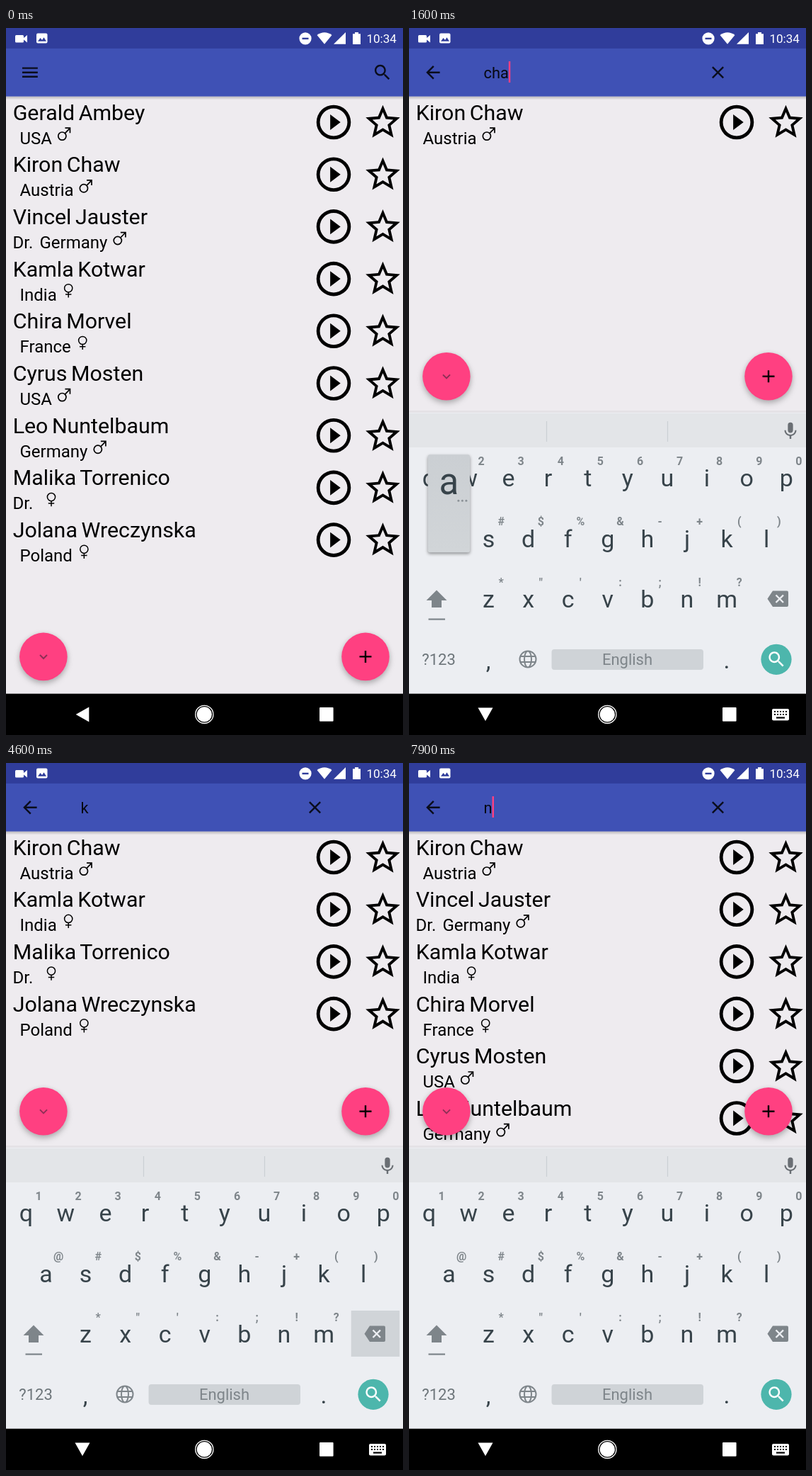
An HTML page that plays this animation: 561x998 px, repeating every 8 s.

```html
<!DOCTYPE html>
<html lang="en">
<head>
<meta charset="utf-8">
<title>Contact search</title>
<style>
  html, body { margin: 0; width: 100%; height: 100%; overflow: hidden; background: #eeebef; }
  svg { display: block; width: 561px; height: 998px; font-family: Roboto, sans-serif; }
  .fab { filter: drop-shadow(0 4px 4px rgba(0, 0, 0, .22)) drop-shadow(0 1px 3px rgba(0, 0, 0, .1)); }
  .pop { filter: drop-shadow(0 2px 2px rgba(0, 0, 0, .4)); }
  .name { word-spacing: -2px; }
</style>
</head>
<body>
<svg id="stage" viewBox="0 0 561 998" xmlns="http://www.w3.org/2000/svg"></svg>
<script>
const LOOP = 8000;
const DP = 561 / 462;
const PITCH = 73.7;
const KEY_W = 56.1;
const QUERY_X = 105.5;
const QUERY_SIZE = 18 * DP;

const people = [
  ['Gerald Ambey', '', 'USA', 'm'],
  ['Kiron Chaw', '', 'Austria', 'm'],
  ['Vincel Jauster', 'Dr.', 'Germany', 'm'],
  ['Kamla Kotwar', '', 'India', 'f'],
  ['Chira Morvel', '', 'France', 'f'],
  ['Cyrus Mosten', '', 'USA', 'm'],
  ['Leo Nuntelbaum', '', 'Germany', 'm'],
  ['Malika Torrenico', 'Dr.', '', 'f'],
  ['Jolana Wreczynska', '', 'Poland', 'f']
];

const keyRows = [
  { keys: 'qwertyuiop', hints: '1234567890', x: 28.3, y: 647 },
  { keys: 'asdfghjkl', hints: '@#$%&-+()', x: 56.4, y: 732.5 },
  { keys: 'zxcvbnm', hints: '*"\':;!?', x: 112.5, y: 818 }
];

// time, query, active key ('<' is backspace), key held down, cursor shown
const steps = [
  [0, '', '', 0, 1],
  [700, '', '', 0, 0],
  [1000, '', 'c', 1, 1],
  [1100, 'c', 'c', 0, 1],
  [1200, 'c', '', 0, 1],
  [1300, 'c', 'h', 1, 1],
  [1400, 'ch', 'h', 0, 1],
  [1500, 'ch', 'a', 1, 1],
  [1600, 'cha', 'a', 0, 1],
  [1700, 'cha', '', 0, 1],
  [1800, 'cha', 'w', 1, 1],
  [1900, 'chaw', 'w', 0, 1],
  [2000, 'chaw', '', 0, 1],
  [2400, 'chaw', '', 0, 0],
  [2700, 'chaw', '<', 1, 0],
  [2800, 'cha', '<', 1, 1],
  [2900, 'ch', '<', 1, 1],
  [3000, 'c', '<', 1, 1],
  [3100, '', '<', 1, 1],
  [3200, '', '', 0, 1],
  [3500, '', '', 0, 0],
  [3600, '', 'k', 1, 0],
  [3700, 'k', 'k', 0, 1],
  [3800, 'k', '', 0, 1],
  [4400, 'k', '', 0, 0],
  [4600, 'k', '<', 1, 0],
  [5000, '', '<', 1, 1],
  [5100, '', '', 0, 1],
  [5500, '', 'd', 1, 1],
  [5600, 'd', 'd', 0, 1],
  [5700, 'd', 'r', 1, 1],
  [5800, 'dr', 'r', 0, 1],
  [5900, 'dr', '', 0, 1],
  [6300, 'dr', '', 0, 0],
  [6600, 'dr', '<', 1, 0],
  [6800, 'd', '', 0, 1],
  [6900, 'd', '<', 1, 1],
  [7000, '', '<', 1, 1],
  [7100, '', '', 0, 1],
  [7500, '', 'n', 1, 1],
  [7600, 'n', 'n', 0, 1],
  [7700, 'n', '', 0, 1]
];

const icons = {
  search: 'M15.5 14h-.79l-.28-.27C15.41 12.59 16 11.11 16 9.5 16 5.91 13.09 3 9.5 3S3 5.91 3 9.5 5.91 16 9.5 16c1.61 0 3.09-.59 4.23-1.57l.27.28v.79l5 4.99L20.49 19zM9.5 14C7 14 5 12 5 9.5S7 5 9.5 5 14 7 14 9.5 12 14 9.5 14z',
  back: 'M20 11H7.83l5.59-5.59L12 4l-8 8 8 8 1.41-1.41L7.83 13H20z',
  close: 'M19 6.41L17.59 5 12 10.59 6.41 5 5 6.41 10.59 12 5 17.59 6.41 19 12 13.41 17.59 19 19 17.59 13.41 12z',
  menu: 'M3 18h18v-2H3zM3 13h18v-2H3zM3 6v2h18V6z',
  play: 'M10 16.5l6-4.5-6-4.5zM12 2a10 10 0 1 0 0 20a10 10 0 1 0 0-20zM12 4a8 8 0 1 1 0 16a8 8 0 1 1 0-16z',
  star: 'M22 9.24l-7.19-.62L12 2 9.19 8.63 2 9.24l5.46 4.73L5.82 21 12 17.27 18.18 21l-1.63-7.03zM12 15.4l-3.76 2.27 1-4.28-3.32-2.88 4.38-.38L12 6.1l1.71 4.04 4.38.38-3.32 2.88 1 4.28z',
  mic: 'M12 14a3 3 0 0 0 3-3V5a3 3 0 0 0-6 0v6a3 3 0 0 0 3 3zm5.3-3c0 3-2.54 5.1-5.3 5.1S6.7 14 6.7 11H5c0 3.41 2.72 6.23 6 6.72V21h2v-3.28c3.28-.48 6-3.3 6-6.72z'
};

const $ = id => document.getElementById(id);
const pen = document.createElement('canvas').getContext('2d');

function widthOf(text, size) {
  pen.font = size + 'px Roboto, sans-serif';
  return pen.measureText(text).width;
}

const esc = s => s.replace(/&/g, '&amp;').replace(/"/g, '&quot;');
const text = (s, x, y, size, more = '') => `<text x="${x}" y="${y}" font-size="${size}" ${more}>${esc(s)}</text>`;
const mid = (s, x, y, size, fill, more = '') => text(s, x, y, size, `fill="${fill}" text-anchor="middle" ${more}`);
const rect = (x, y, w, h, fill, more = '') => `<rect x="${x}" y="${y}" width="${w}" height="${h}" fill="${fill}" ${more}/>`;
const disc = (x, y, r, fill, more = '') => `<circle cx="${x}" cy="${y}" r="${r}" fill="${fill}" ${more}/>`;
const path = (d, more = '') => `<path d="${d}" ${more}/>`;
const line = (d, stroke, w, more = '') => path(d, `fill="none" stroke="${stroke}" stroke-width="${w}" ${more}`);
const group = (id, body, more = '') => `<g id="${id}" ${more}>${body}</g>`;
// places a 24-unit icon with its middle at x, y
const icon = (name, x, y, fill, scale = DP) =>
  path(icons[name], `fill="${fill}" fill-rule="evenodd" transform="translate(${x - 12 * scale} ${y - 12 * scale}) scale(${scale})"`);

function sign(sex, x) {
  return sex === 'm'
    ? disc(x + 6.4, 152.6, 5.6, 'none', 'stroke="#000" stroke-width="1.7"') +
      line(`M${x + 10.4} 148.6L${x + 17.2} 141.6M${x + 10.5} 141.2H${x + 17.5}V148.2`, '#000', 1.7)
    : disc(x + 7.5, 146.2, 5.6, 'none', 'stroke="#000" stroke-width="1.5"') +
      line(`M${x + 7.5} 151.7V159.3M${x + 3.3} 155H${x + 11.7}`, '#000', 1.5);
}

function personRow([name, title, country, sex]) {
  const x = title ? 47.5 : 19.5;
  return text(name, 9.7, 129.6, 25 * DP, 'class="name"') +
    text(title, 9.5, 163.5, 24) +
    text(country, x, 163.5, 24) +
    sign(sex, x + widthOf(country, 24) + (sex === 'm' ? 8 : 9)) +
    icon('play', 463, 133, '#000', 2 * DP) +
    icon('star', 532.5, 133, '#000', 2 * DP);
}

function statusBar() {
  return rect(0, 0, 561, 28.9, '#303d9b') +
    rect(13, 10, 12, 10.5, '#fff', 'rx="1.5"') + path('M25 14L30 10V20.5L25 16.5z', 'fill="#fff"') +
    rect(43, 7.5, 15.5, 14, '#fff', 'rx="2"') + path('M45 18.8L48.5 14 51 17 53.5 13.2 57 18.8z', 'fill="#303d9b"') +
    disc(423, 14.8, 8.6, '#fff') + rect(418.5, 13.7, 9, 2.4, '#303d9b') +
    path('M439.5 10Q450 2.5 460.5 10L450 22.8z', 'fill="#fff"') +
    path('M463 22.8L480 6V22.8z', 'fill="#fff"') +
    path('M490 8.2H493V6H498V8.2H501V23H490z', 'fill="#fff"') +
    text('10:34', 509.5, 20.8, 17, 'fill="#fff"');
}

function toolbar() {
  const ink = '#0a0d1c';
  return rect(0, 96.5, 561, 5, 'url(#shade)') +
    rect(0, 28, 561, 68.6, '#3f51b5') +
    group('home', icon('menu', 33.9, 62.7, ink) + icon('search', 531.9, 62.7, ink)) +
    disc(531.9, 62.7, 27, '#fff', 'id="ripple" fill-opacity=".14"') +
    group('find',
      icon('back', 33.9, 62.7, ink) +
      group('clear', icon('close', 436.5, 62.7, ink)) +
      text('', QUERY_X, 70.8, QUERY_SIZE, 'id="query"') +
      rect(106, 47, 2.4, 30, '#ff4081', 'id="cursor"'));
}

function fabs() {
  return disc(52.9, 0, 33.8, '#ff4081', 'class="fab"') + disc(508, 0, 33.8, '#ff4081', 'class="fab"') +
    line('M48-2.4L53 2.6 58-2.4', '#8f2f56', 2) +
    line('M499.5 0H516.5M508-8.5V8.5', '#000', 2.4);
}

function keyboard() {
  const grey = '#7e858a';
  const dark = '#37434a';
  const panel = '#eceef2';
  let out = rect(0, 540, 561, 4, '#000', 'fill-opacity=".04"') +
    rect(0, 543, 561, 397, panel) + rect(0, 544, 561, 48, '#e3e5e8') +
    line('M194.5 555V584M365.5 555V584', '#cbcfd3', 1.2) +
    icon('mic', 539, 569, '#6a6f74') +
    rect(0, 0, 47, 65, '#d0d4d8', 'id="held"');
  for (const row of keyRows) {
    [...row.keys].forEach((key, i) => {
      const x = row.x + i * KEY_W;
      out += mid(key, x, row.y, 34, dark) + mid(row.hints[i], x + 17.7, row.y - 30.3, 16, grey, 'font-weight="700"');
    });
  }
  out += path('M39 793.5L53.5 808H46V818H32V808H24.5z', `fill="${grey}"`) + rect(27.5, 833.5, 23.5, 2.2, grey) +
    path('M514 794.5H534Q536 794.5 536 796.5V815Q536 817 534 817H514L506.5 805.8z', `fill="${grey}"`) +
    line('M518.5 800.5L529 811M529 800.5L518.5 811', panel, 2.4) +
    mid('?123', 42, 899, 22, '#6d757a') + mid(',', 112, 904.5, 34, dark) + mid('.', 449, 904, 34, dark) +
    line('M156.5 891a11.5 11.5 0 1 0 23 0a11.5 11.5 0 1 0-23 0M163 891a5 11.5 0 1 0 10 0a5 11.5 0 1 0-10 0M158 887H178M158 895H178', grey, 2) +
    rect(201.5, 877, 214.5, 29, '#cfd3d7', 'rx="4"') + mid('English', 308.5, 899, 22, grey) +
    disc(519, 891.3, 21.6, '#4db6ac') + icon('search', 519.3, 891.3, '#fff');
  const dots = [13.5, 19, 24.5].map(x => disc(x, 65, 1.5, '#8b9297')).join('');
  return out + group('popup',
    rect(-29.7, 0, 59.4, 138, 'url(#pop)', 'rx="3" class="pop"') + mid('', 0, 55.5, 51, dark, 'id="big"') + dots);
}

function navBar() {
  const arrow = 'M97.5 959.6H118.5L108 978.2z';
  let dots = '';
  for (let r = 0; r < 2; r++)
    for (let i = 0; i < 5; i++) dots += rect(516 + i * 4, 964 + r * 4, 2, 2, '#000');
  return rect(0, 939.7, 561, 59, '#000') +
    path(arrow, 'id="navBack" fill="#fff" transform="rotate(90 108 968.9)"') +
    group('navDown', path(arrow) + rect(513, 961, 24, 16.5, '#fff', 'rx="2"') +
      dots + rect(519, 972.5, 12, 2.2, '#000'), 'fill="#fff"') +
    disc(280.3, 968.9, 10.6, '#fff') + disc(280.3, 968.9, 12.6, 'none', 'stroke="#fff" stroke-width="1.3"') +
    rect(443, 959.1, 19.6, 19.6, '#fff', 'rx="1"');
}

const fade = (id, a, b) =>
  `<linearGradient id="${id}" x1="0" y1="0" x2="0" y2="1"><stop offset="0" ${a}/><stop offset="1" ${b}/></linearGradient>`;

$('stage').innerHTML =
  `<defs>${fade('shade', 'stop-color="#000" stop-opacity=".22"', 'stop-color="#000" stop-opacity="0"')}
  ${fade('pop', 'stop-color="#cbcfd3"', 'stop-color="#d1d5d8"')}</defs>` +
  rect(0, 0, 561, 998, '#eeebef') +
  people.map((p, i) => group('row' + i, personRow(p))).join('') +
  toolbar() + statusBar() + group('fabs', fabs()) + group('keys', keyboard()) + navBar();

const show = (id, on) => $(id).setAttribute('display', on ? 'inline' : 'none');
const move = (id, x, y) => $(id).setAttribute('transform', `translate(${x} ${y})`);

function filterRows(query) {
  let n = 0;
  people.forEach(([name, title, country], i) => {
    const hit = `${name} ${title} ${country}`.toLowerCase().includes(query);
    show('row' + i, hit);
    if (hit) move('row' + i, 0, PITCH * n++);
  });
}

function pressKey(key, down) {
  const row = keyRows.find(r => key && r.keys.includes(key));
  show('popup', row);
  show('held', down);
  $('held').setAttribute('width', key === '<' ? 68.5 : 47);
  if (key === '<') move('held', 487.7, 773);
  if (!row) return;
  const x = row.x + row.keys.indexOf(key) * KEY_W;
  move('held', x - 23.5, row.y - 45.3);
  move('popup', x, row.y - 130.3);
  $('big').textContent = key;
}

function draw(t) {
  const [, query, key, down, cursor] = steps.filter(s => s[0] <= t).pop();
  const searching = t >= 200;
  const raised = t >= 400;
  const rise = Math.min(1, Math.max(0, (t - 300) / 350));

  show('ripple', t >= 100 && t < 300);
  show('home', !searching);
  show('find', searching);
  show('clear', query);
  $('query').textContent = query || 'Search…';
  $('query').setAttribute('fill-opacity', query ? .9 : .45);
  show('cursor', cursor);
  $('cursor').setAttribute('x', QUERY_X + widthOf(query, QUERY_SIZE));
  $('cursor').setAttribute('width', query ? 2.4 : 1.8);

  filterRows(query);
  move('fabs', 0, raised ? 491.8 : 887.4);
  show('keys', rise > 0);
  move('keys', 0, 397 * (1 - rise) ** 3);
  pressKey(key, down);
  show('navBack', !raised);
  show('navDown', raised);
}

const start = performance.now();
function tick() {
  draw((performance.now() - start) % LOOP);
  requestAnimationFrame(tick);
}
tick();
</script>
</body>
</html>
```
